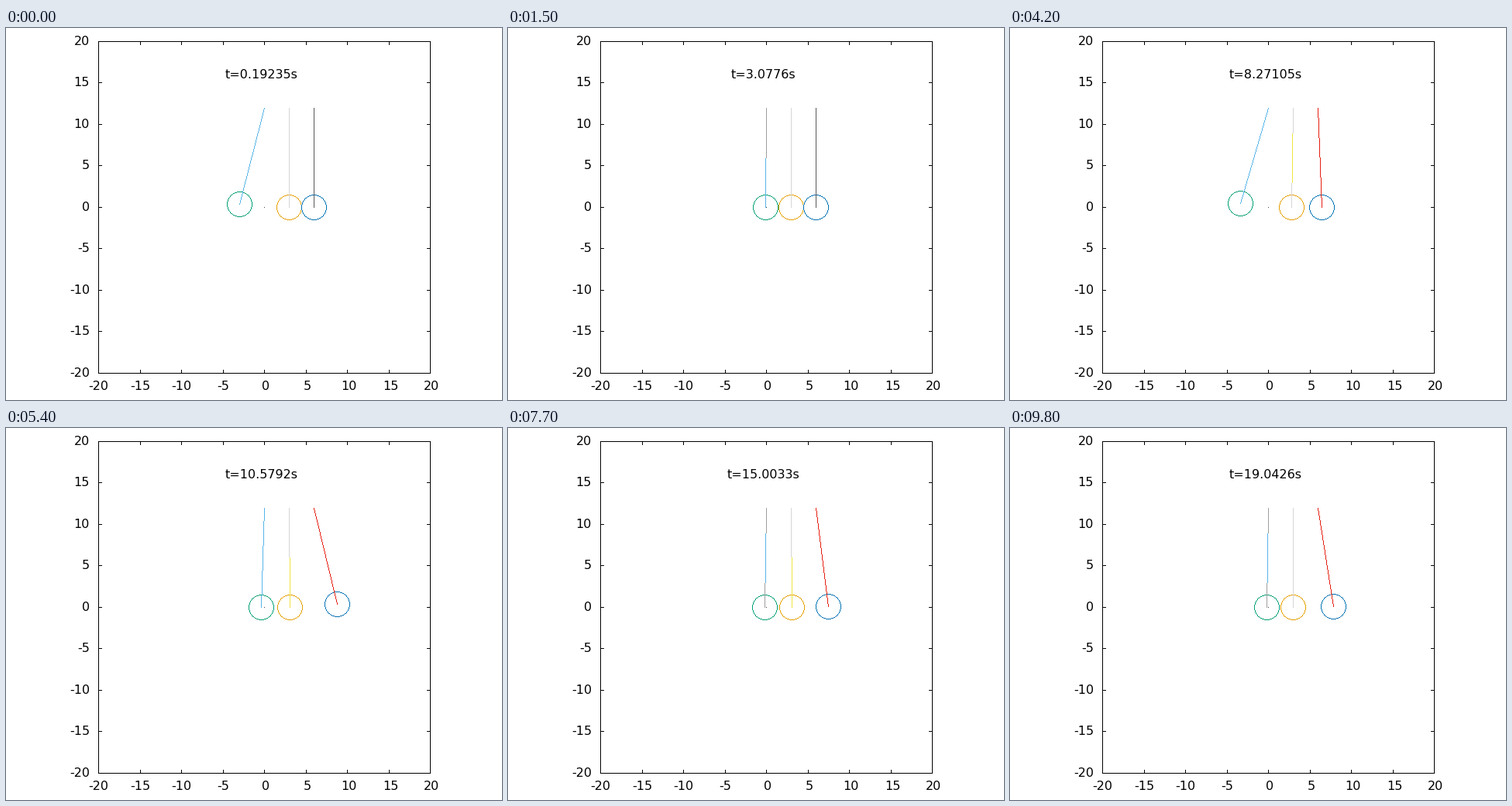
A matplotlib script that plays this animation: 640 px wide and 480 px high, repeating every 9.9 s.

```python
import math

import matplotlib.pyplot as plt
import numpy as np
from matplotlib.animation import FuncAnimation

W, H, DPI = 640, 480, 100
FRAMES, INTERVAL = 99, 100
LEFT, RIGHT, TOP, BOTTOM = 119, 547, 17, 445
SCALE = (RIGHT - LEFT) / 40

STEP = 0.19235      # simulated seconds per frame
PERIOD = 21.225     # swing period in frames
LENGTH = 12
RADIUS_PX = 16

# Swing of the three balls between one collision and the next
SWINGS = [
    (-3.11, 0.00, 0.00), (-0.25, 0.42, 2.90),
    (-3.15, -0.25, 0.30), (-0.62, 0.42, 3.41),
    (-3.40, -0.19, 0.46), (-0.45, 0.15, 3.36),
    (-3.36, 0.09, 0.14), (-0.35, 0.20, 3.20),
    (-3.43, 0.14, 0.21), (-0.40, 0.00, 3.54),
]
BALL_COLORS = [(0, 158, 115), (230, 159, 0), (0, 114, 178)]
ROD_COLORS = [(86, 180, 233), (240, 228, 66), (229, 30, 16)]
DOT_COLOR = (68, 68, 68)

FONT_PX = 16
ADVANCE = {"-": 0.361, ".": 0.318, "t": 0.392, "=": 0.838, "s": 0.521}


def to_px(x, y):
    px = LEFT + math.floor(SCALE * (x + 20) + 0.5)
    py = BOTTOM - math.floor(SCALE * (y + 20) + 0.5)
    return px, py


def text_width(text):
    return FONT_PX * sum(ADVANCE.get(ch, 0.636) for ch in text)


def grey(color):
    return (round(np.dot(color, (0.299, 0.587, 0.114))),) * 3


def draw_circle(img, cx, cy, color):
    for a in range(math.ceil(RADIUS_PX / math.sqrt(2)) + 1):
        b = round(math.sqrt(RADIUS_PX ** 2 - a * a))
        for dx, dy in ((a, b), (b, a)):
            for sx in (-1, 1):
                for sy in (-1, 1):
                    img[cy + sy * dy, cx + sx * dx] = color


def draw_rod(img, start, end, color):
    (x0, y0), (x1, y1) = start, end
    upright = abs(x1 - x0) <= 3
    for y in range(y0, y1 + 1):
        x = math.floor(x0 + (x1 - x0) * (y - y0) / (y1 - y0) + 0.5)
        # near-vertical rods lose their tint on odd columns
        img[y, x] = grey(color) if upright and x % 2 else color


def make_background():
    img = np.full((H, W, 3), 255, np.uint8)
    img[[TOP, BOTTOM], LEFT:RIGHT + 1] = 0
    img[TOP:BOTTOM + 1, [LEFT, RIGHT]] = 0
    for value in range(-20, 21, 5):
        x, y = to_px(value, value)
        img[TOP:TOP + 5, x] = 0
        img[BOTTOM - 4:BOTTOM + 1, x] = 0
        img[y, LEFT:LEFT + 5] = 0
        img[y, RIGHT - 4:RIGHT + 1] = 0
    x, y = to_px(0, 0)
    img[y, x] = DOT_COLOR
    return img


def render(step):
    img = background.copy()
    swing = SWINGS[math.floor(2 * step / PERIOD + 0.5)]
    reach = abs(math.cos(2 * math.pi * step / PERIOD))
    for i, amplitude in enumerate(swing):
        dx = amplitude * reach
        pivot = to_px(3 * i, LENGTH)
        center = to_px(3 * i + dx, LENGTH - math.sqrt(LENGTH ** 2 - dx * dx))
        draw_circle(img, *center, BALL_COLORS[i])
        draw_rod(img, pivot, center, ROD_COLORS[i])
    return img


plt.rcParams["font.family"] = "DejaVu Sans"
plt.rcParams["font.size"] = FONT_PX * 72 / DPI

fig = plt.figure(figsize=(W / DPI, H / DPI), dpi=DPI, facecolor="white")
ax = fig.add_axes([0, 0, 1, 1])
ax.axis("off")
background = make_background()
picture = ax.imshow(background, extent=(0, W, H, 0), interpolation="nearest",
                    aspect="auto")
ax.set_xlim(0, W)
ax.set_ylim(H, 0)

for value in range(-20, 21, 5):
    label = str(value)
    width = text_width(label)
    x, y = to_px(value, value)
    shift = 2 if value >= 0 else 0.5
    ax.text(x + shift - width / 2, 467, label)
    ax.text(108 - width, y + 5, label)

clock = ax.text(0, 65, "")


def update(frame):
    step = frame + 1
    label = f"t={step * STEP - 1e-9:.6g}s"
    clock.set_text(label)
    clock.set_x(330 - text_width(label) / 2)
    picture.set_data(render(step))
    return picture, clock


anim = FuncAnimation(fig, update, frames=FRAMES, interval=INTERVAL,
                     repeat=True, repeat_delay=0)
plt.show()
```
